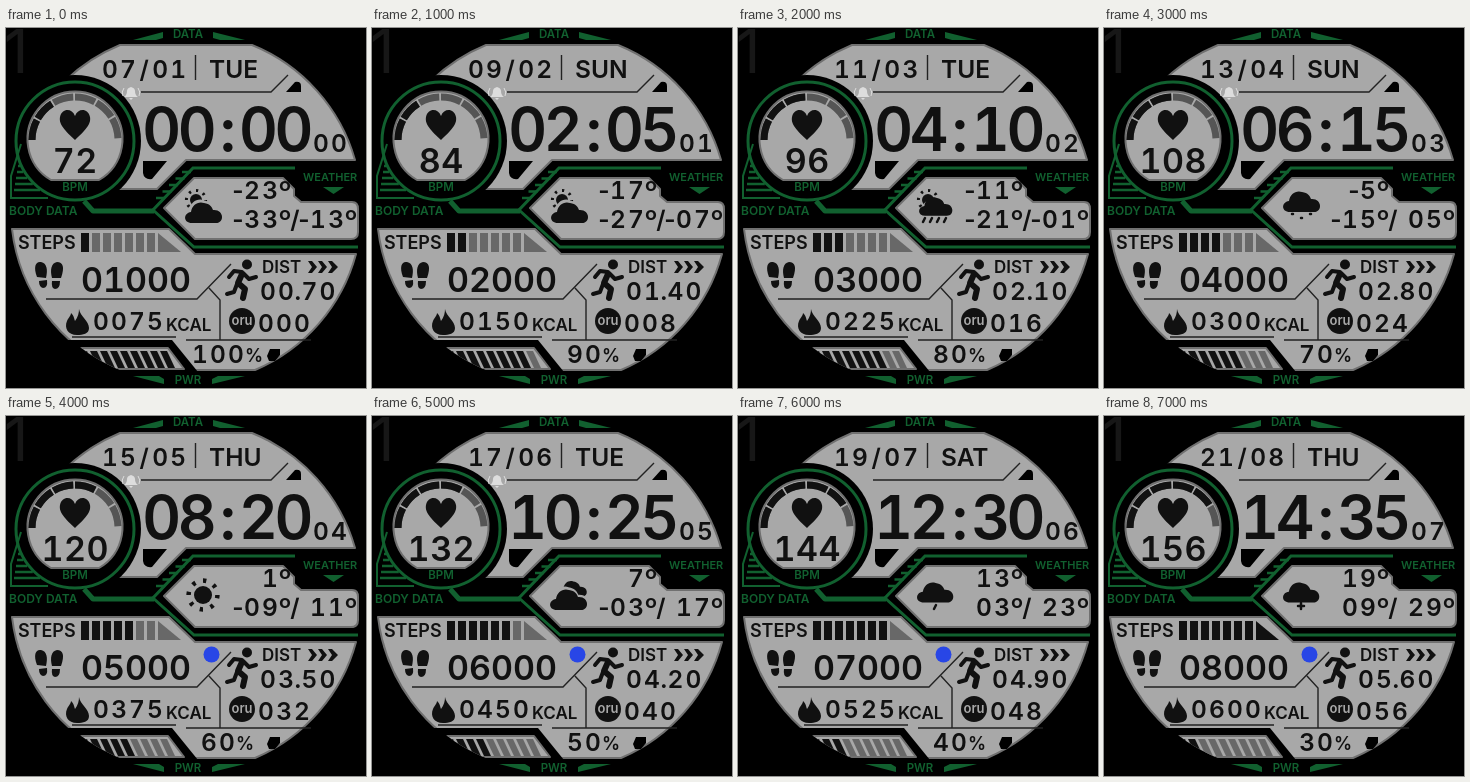
An HTML page for the animation above (8000 ms loop, 360x360 px).

```html
<!DOCTYPE html>
<html>
<head>
<meta charset="utf-8">
<style>
html, body { margin: 0; width: 100%; height: 100%; overflow: hidden; background: #000; }
svg { display: block; width: 100vw; height: 100vh; }
text { font-family: Inter, "DejaVu Sans", sans-serif; font-weight: 600; fill: #111; white-space: pre; }
#live text { font-variant-numeric: tabular-nums; }
.green { fill: #11602f; }
.wire { fill: none; stroke: #11602f; stroke-width: 3; }
.panel { fill: #a8a8a8; stroke: #707070; stroke-width: 2; stroke-linejoin: round; }
.line { fill: none; stroke: #222; stroke-width: 1.4; }
.limb { fill: none; stroke: #111; stroke-linecap: round; stroke-linejoin: round; }
</style>
</head>
<body>
<svg viewBox="0 0 360 360">
  <defs>
    <clipPath id="disc"><circle cx="180" cy="180" r="175"/></clipPath>
    <path id="cloud" d="M7 22C-2 22-2 12 6 11C7 4 13 0 19 2C25 3 27 6 28 9C39 8 40 22 31 22Z"/>
  </defs>
  <text x="-2" y="45" style="font-size:60px;font-weight:400;fill:#171717">1</text>

  <path class="panel" d="M114 17H246A176 176 0 0 1 349 132H180L151 161H112L60 52A176 176 0 0 1 114 17Z"/>
  <path class="panel" d="M6 201H163L189 226H350A176 176 0 0 1 249 342H111A176 176 0 0 1 6 201Z"/>
  <path d="M50 312H166L192 344H50Z"/>
  <g clip-path="url(#disc)"><path class="panel" d="M50 320H162L178 341H50Z"/></g>
  <circle cx="69" cy="113" r="66"/>
  <path class="panel" d="M158 180L188 150H277L288 161V168L295 174H346Q352 174 352 181V204Q352 211 345 211H189Z"/>

  <path class="wire" d="M289 140H187L147 182L188 219H352"/>
  <path class="wire" stroke-linejoin="round" style="stroke-width:5" d="M78 173L87 183H148"/>
  <circle class="wire" cx="69" cy="113" r="59"/>
  <path class="panel" d="M45 152A47.500 47.500 0 1 1 93 152Z"/>
  <path class="wire" style="stroke-width:2" d="M15 116L5 148V170H42"/>
  <g id="hatch" class="wire" style="stroke-width:2.500"></g>
  <path class="green" d="M127 12L157 4V10L150 12ZM239 12L207 4V10L214 12ZM127 348H153L158 351V356ZM239 348H212L206 351V356ZM317 159H338L327.500 166Z"/>

  <path class="line" d="M189.500 27V52M135 64H265L282 47M40 271H191L225 236M203 260L214 272V312M66 309H170M180 312H305"/>
  <path d="M280 64L289 54Q295 53 295 58V64ZM137 133H161L146 151Q138 152 137 145ZM261 328L264 321H274V327L269 333H263Z"/>
  <path d="M69 112C56 100 53 95 54 89C56 80 66 80 69 88C72 80 82 80 84 89C85 95 82 100 69 112Z" fill="#111"/>

  <g fill="#111">
    <path d="M31 249C27 238 30 233 35 234C41 235 42 242 40 250ZM33 253L41 252Q42 260 37 260Q33 259 33 253ZM46 250C44 242 45 235 51 234C57 234 59 239 55 250ZM46 253L54 253Q54 261 49 261Q45 260 46 253Z"/>
    <path d="M73 281C74 288 83 293 83 300C83 306 77 307 71 307C62 307 58 300 61 293C62 290 65 288 65 285C68 288 68 290 69 293C72 289 73 285 73 281Z"/>
    <circle cx="241" cy="236.500" r="5"/>
    <path d="M302 233H306L311 239L306 245H302L306 239ZM312 233H316L321 239L316 245H312L316 239ZM322 233H326L332 239L326 245H322L326 239Z"/>
    <circle cx="236" cy="293" r="13"/>
  </g>
  <path class="limb" stroke-width="6" d="M236 246L232 255L239 261L237 270"/>
  <path class="limb" stroke-width="4" d="M236 244L228 243L223 249M237 245L243 251L250 249M231 256L228 264L221 266"/>
  <g id="labels"></g>
  <g id="live"></g>
</svg>
<script>
const $ = id => document.getElementById(id);
const range = n => [...Array(n).keys()];
const pad = (v, n = 2) => String(v).padStart(n, '0');
const cells = { '-': .55, ' ': .55, 'º': .67, '/': .45, '\u2009': .17, '.': .3, ':': .72 };

const label = (s, x, y, size, fill = '#111', anchor = 'start') =>
  `<text x="${x}" y="${y}" font-size="${size}" text-anchor="${anchor}" style="fill:${fill}">${s}</text>`;

// Places characters in fixed cells; align is 0 for left, .5 for centre, 1 for right.
function digits(s, x, y, size, pitch, align = 0) {
  const widths = [...s].map(c => (cells[c] || 1) * pitch);
  let left = x - align * widths.reduce((a, b) => a + b, 0);
  const xs = widths.map(w => (left += w) - w / 2);
  return `<text x="${xs.join(' ')}" y="${y}" font-size="${size}" text-anchor="middle">${s}</text>`;
}
const small = (s, x, y, align) => digits(s, x, y, 24.5, 18, align);

const green = '#11602f';
$('labels').innerHTML =
  label('DATA', 182, 10, 11.5, green, 'middle') +
  label('PWR', 182, 356, 11.5, green, 'middle') +
  label('BPM', 69, 163, 11.5, green, 'middle') +
  label('WEATHER', 297, 153, 11, green) +
  label('BODY DATA', 3, 187, 12, green) +
  label('STEPS', 12, 221, 18) + label('KCAL', 160, 303, 17) + label('DIST', 256, 245, 17) +
  label('oru', 236, 297, 13, '#a8a8a8', 'middle');

$('hatch').innerHTML =
  range(6).map(i => `<path d="M${13 - i} ${132 + i * 6}H${14 + i * i * .8}"/>`).join('') +
  range(5).map(i => `<path d="M${176 - i * 6.5} ${144 + i * 6.5}h9"/>`).join('');

const cloud = (x, y, scale = 1, fill = '#111') =>
  `<use href="#cloud" transform="translate(${x} ${y}) scale(${scale})" fill="${fill}"/>`;
const sun = (x, y, r) => `<circle cx="${x}" cy="${y}" r="${r}" fill="#111"/>` +
  `<circle cx="${x}" cy="${y}" r="${r * 1.6}" pathLength="16" fill="none" stroke="#111" stroke-width="${r / 2}" stroke-dasharray=".6 1.4"/>`;
const sunBehind = sun(190, 172, 6) + cloud(177, 170, 1.08, '#a8a8a8');
const marks = d => `<path class="limb" stroke-width="2.500" d="${d}"/>`;
const drops = marks('M187 190L185 194M194 190L192 194M201 190L199 194M208 190L206 194');
const flakes = marks('M188 186h1M197 190h1M206 186h1');
const partly = sunBehind + cloud(179, 173);
const skies = [
  partly,
  partly,
  sunBehind + cloud(181, 168, .9) + drops,
  cloud(179, 162) + flakes,
  sun(197, 179, 9),
  cloud(187, 164, .75) + cloud(176, 169, 1.08, '#a8a8a8') + cloud(178, 172),
  cloud(179, 165, .98) + marks('M198 189L196 193'),
  cloud(179, 165, .98) + marks('M194 190h6M197 187v6')
];

const stepBar = on => range(8).map(i => {
  const x = 75 + i * 11;
  const d = i < 7 ? `M${x} 205H${x + 8}V224H${x}Z` : 'M152 205L175 224H152Z';
  return `<path d="${d}" fill="${i < on ? '#111' : '#686868'}"/>`;
}).join('');

const powerBar = on => '<g clip-path="url(#disc)">' + range(10).map(i =>
  `<path d="M${64 + i * 10} 323h7l8 17h-7Z" fill="${i < on ? '#111' : '#686868'}"/>`).join('') + '</g>';

const arc = (dash, color) =>
  `<path d="M26 112A43 43 0 0 1 112 112" pathLength="6" fill="none" stroke="${color}" stroke-width="7" stroke-dasharray="${dash}"/>`;

const bell = '<path d="M118 69Q121 67 121 63Q121 60 125 59Q129 60 129 63Q129 67 132 69ZM123 70H127L125 72Z" fill="#ddd"/>' +
  '<path d="M118 60Q115 64 117 68M132 60Q135 64 133 68" fill="none" stroke="#ddd"/>';

function draw(n) {
  const day = 7 + 2 * n, bpm = 72 + 12 * n, power = String(100 - 10 * n);
  const weekday = ['SUN', 'MON', 'TUE', 'WED', 'THU', 'FRI', 'SAT'][new Date(2025, n, day).getDay()];
  const temp = 6 * n - 23;
  const signed = (v, plus) => (v < 0 ? '-' : plus) + pad(Math.abs(v));
  $('live').innerHTML =
    small(`${pad(day)}\u2009/\u2009${pad(n + 1)}`, 95, 50) +
    label(weekday, 203, 50, 24.5) +
    digits(`${pad(2 * n)}:${pad(5 * n)}`, 138, 123, 60, 35.5) +
    small(pad(n), 306, 124) +
    digits(String(bpm), 69, 145, 34, 22.5, .5) +
    arc('.92 .08', '#555') +
    arc('.92 .08 '.repeat(Math.floor((bpm - 24) / 24)) + '0 99', '#111') +
    small(`${temp}º`, 285, 171, 1) +
    small(`${signed(temp - 10, '')}º/${signed(temp + 10, ' ')}º`, 351, 200, 1) +
    skies[n] +
    stepBar(n + 1) +
    digits(pad(1000 * (n + 1), 5), 75, 264, 34, 22) +
    small(pad(75 * (n + 1), 4), 86, 302) +
    small((.7 * (n + 1)).toFixed(2).padStart(5, '0'), 253, 272) +
    small(pad(8 * n, 3), 251, 304) +
    powerBar(power / 10) +
    small(power, 212, 335, .5) +
    label('%', 212 + power.length * 9, 334, 18) +
    (n < 6 ? bell : '') +
    (n > 3 ? '<circle cx="205.500" cy="238.500" r="8" fill="#2846e6"/>' : '');
}

let shown = -1;
function tick() {
  const n = Math.floor(performance.now() / 1000) % 8;
  if (n !== shown) draw(shown = n);
  requestAnimationFrame(tick);
}
tick();
</script>
</body>
</html>
```
